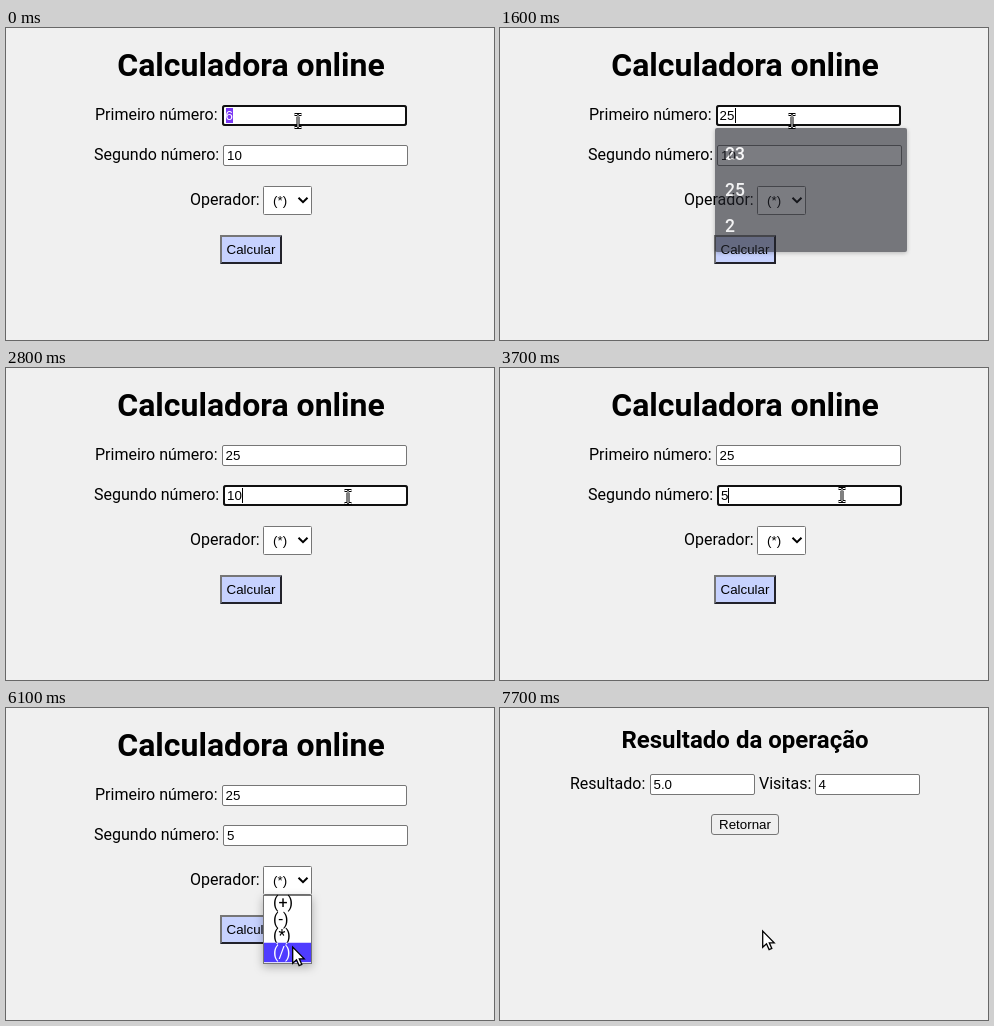
Write an HTML page that moves like this. It is 488x312 px and loops after 8 s.

```html
<!DOCTYPE html>
<html lang="pt">
<head>
<meta charset="utf-8">
<title>Calculadora online</title>
<style>
  html, body { margin: 0; width: 100%; height: 100%; overflow: hidden; background: #f0f0f0; }
  svg { display: block; width: 488px; height: 312px; }
  text { font: 16px Roboto, sans-serif; white-space: pre; }
  .ui text, text.ui { font: 13.333px "Liberation Sans", Arial, sans-serif; }
  .mid { text-anchor: middle; }
  text.h1 { font-size: 32px; font-weight: 700; }
  text.h2 { font-size: 24px; font-weight: 700; }
  .box { fill: #fff; stroke: #767676; }
  .ring { fill: none; stroke: #101010; stroke-width: 2; }
  .mark { fill: #7a38f5; }
  .caret { fill: #000; }
  .white text, text.white { fill: #fff; }
  .suggest text { font-size: 17.5px; font-weight: 500; fill: #f4f4f6; }
  .suggest rect { fill: #23252d; filter: drop-shadow(0 1px 2px rgba(0, 0, 0, .4)); }
  .popup > .box { filter: drop-shadow(0 3px 5px rgba(0, 0, 0, .28)); }

  /* Every part switches hard; 1.25% is 100 ms */
  [style*="--k"] { animation: var(--k) 8s step-end infinite; }

  @keyframes calc { 0% { opacity: 1 } 96.25%, 100% { opacity: 0 } }
  @keyframes result { 0% { opacity: 0 } 96.25%, 100% { opacity: 1 } }

  @keyframes first-focus { 0% { opacity: 1 } 35%, 100% { opacity: 0 } }
  @keyframes first-old { 0% { opacity: 1 } 16.25%, 100% { opacity: 0 } }
  @keyframes first-typing { 0% { opacity: 0 } 16.25% { opacity: 1 } 20%, 100% { opacity: 0 } }
  @keyframes first-typed { 0% { opacity: 0 } 20%, 100% { opacity: 1 } }
  @keyframes first-caret { 0% { opacity: 0 } 20% { opacity: 1 } 27.5%, 100% { opacity: 0 } }
  @keyframes suggest { 0% { opacity: 0 } 16.25% { opacity: 1 } 20% { opacity: .6 } 21.25% { opacity: .15 } 22.5%, 100% { opacity: 0 } }

  @keyframes second-focus { 0% { opacity: 0 } 35% { opacity: 1 } 67.5%, 100% { opacity: 0 } }
  @keyframes second-old { 0% { opacity: 1 } 38.75%, 100% { opacity: 0 } }
  @keyframes second-click { 0% { opacity: 0 } 35% { opacity: 1 } 38.75%, 100% { opacity: 0 } }
  @keyframes second-marked { 0% { opacity: 0 } 38.75% { opacity: 1 } 46.25%, 100% { opacity: 0 } }
  @keyframes second-typed { 0% { opacity: 0 } 46.25%, 100% { opacity: 1 } }
  @keyframes second-caret { 0% { opacity: 0 } 46.25% { opacity: 1 } 53.75% { opacity: 0 } 58.75% { opacity: 1 } 67.5%, 100% { opacity: 0 } }

  @keyframes popup { 0% { opacity: 0 } 67.5% { opacity: 1 } 81.25%, 100% { opacity: 0 } }
  @keyframes lit {
    0% { clip-path: inset(33.2px 0 16.6px) }
    71.25% { clip-path: inset(0 0 49.8px) }
    72.5% { clip-path: inset(16.6px 0 33.2px) }
    73.75% { clip-path: inset(33.2px 0 16.6px) }
    75%, 100% { clip-path: inset(49.8px 0 0) }
  }
  @keyframes op-old { 0% { opacity: 1 } 81.25%, 100% { opacity: 0 } }
  @keyframes op-new { 0% { opacity: 0 } 81.25%, 100% { opacity: 1 } }
  @keyframes op-focus { 0% { opacity: 0 } 81.25% { opacity: 1 } 93.75%, 100% { opacity: 0 } }
  @keyframes press { 0% { opacity: 0 } 93.75%, 100% { opacity: 1 } }

  @keyframes beam { 0% { opacity: 1 } 23.75% { opacity: 0 } 31.25% { opacity: 1 } 53.75%, 100% { opacity: 0 } }
  @keyframes arrow { 0% { opacity: 0 } 23.75% { opacity: 1 } 31.25% { opacity: 0 } 53.75%, 100% { opacity: 1 } }
  @keyframes pointer {
    0% { transform: translate(292px, 93px) }
    23.75% { transform: translate(302px, 66px) }
    25% { transform: translate(318px, 45px) }
    27.5% { transform: translate(326px, 52px) }
    28.75% { transform: translate(333px, 70px) }
    30% { transform: translate(337px, 102px) }
    31.25% { transform: translate(340px, 119px) }
    32.5% { transform: translate(341px, 125px) }
    33.75% { transform: translate(342px, 128px) }
    35% { transform: translate(342px, 129px) }
    37.5% { transform: translate(342px, 127px) }
    53.75% { transform: translate(334px, 142px) }
    55% { transform: translate(308px, 154px) }
    56.25% { transform: translate(291px, 159px) }
    58.75% { transform: translate(291px, 165px) }
    60% { transform: translate(289px, 163px) }
    61.25% { transform: translate(288px, 161px) }
    63.75% { transform: translate(288px, 165px) }
    65% { transform: translate(288px, 170px) }
    70% { transform: translate(288px, 178px) }
    71.25% { transform: translate(288px, 196px) }
    72.5% { transform: translate(287px, 213px) }
    73.75% { transform: translate(287px, 227px) }
    75% { transform: translate(286px, 236px) }
    76.25% { transform: translate(286px, 238px) }
    85% { transform: translate(279px, 234px) }
    86.25% { transform: translate(268px, 227px) }
    87.5% { transform: translate(260px, 221px) }
    88.75%, 100% { transform: translate(262px, 222px) }
  }
</style>
</head>
<body>
<svg viewBox="0 0 488 312">
  <defs>
    <g id="options">
      <text x="267" y="200">(+)</text>
      <text x="267" y="217">(-)</text>
      <text x="267" y="233">(*)</text>
      <text x="267" y="250">(/)</text>
    </g>
    <path id="ibeam" d="M-3.5 -6.5H-1L0 -5.5L1 -6.5H3.5M0 -5.5V5.5M-3.5 6.5H-1L0 5.5L1 6.5H3.5"/>
  </defs>

  <g style="--k: calc">
    <text class="h1 mid" x="245" y="48">Calculadora online</text>
    <text x="89" y="92">Primeiro número:</text>
    <text x="88" y="132">Segundo número:</text>
    <text x="184" y="177">Operador:</text>

    <g class="ui">
      <rect class="box" x="216.5" y="77.5" width="184" height="20" rx="1.5"/>
      <rect class="ring" x="217" y="78" width="183" height="19" rx="2" style="--k: first-focus"/>
      <g style="--k: first-old">
        <rect class="mark" x="220" y="80" width="7" height="15"/>
        <text class="white" x="219.5" y="92">6</text>
      </g>
      <g style="--k: first-typing">
        <text x="219.5" y="92">2</text>
        <rect class="caret" x="227" y="80" width="1" height="15"/>
      </g>
      <text x="219.5" y="92" style="--k: first-typed">25</text>
      <rect class="caret" x="235" y="80" width="1" height="15" style="--k: first-caret"/>

      <rect class="box" x="217.5" y="117.5" width="184" height="20" rx="1.5"/>
      <rect class="ring" x="218" y="118" width="183" height="19" rx="2" style="--k: second-focus"/>
      <text x="221" y="132" style="--k: second-old">10</text>
      <rect class="caret" x="236" y="120" width="1" height="15" style="--k: second-click"/>
      <g style="--k: second-marked">
        <rect class="mark" x="221" y="120" width="15" height="15"/>
        <text class="white" x="221" y="132">10</text>
      </g>
      <text x="221" y="132" style="--k: second-typed">5</text>
      <rect class="caret" x="228" y="120" width="1" height="15" style="--k: second-caret"/>

      <rect class="box" x="257.5" y="158.5" width="48" height="28" rx="1"/>
      <rect class="ring" x="258" y="159" width="47" height="27" rx="1.5" style="--k: op-focus"/>
      <text x="267" y="177" style="--k: op-old">(*)</text>
      <text x="267" y="177" style="--k: op-new">(/)</text>
      <path d="M292.5 169.8L297 174.2L301.5 169.8" fill="none" stroke="#000" stroke-width="2"/>

      <rect x="214" y="207" width="62" height="29" fill="#c7d2fe"/>
      <path d="M214 236V207H276L274 209H216V234Z" fill="#767676"/>
      <path d="M276 207V236H214L216 234H274V209Z" fill="#22222a"/>
      <g style="--k: press">
        <path d="M214 236V207H276L274 209H216V234Z" fill="#22222a"/>
        <path d="M276 207V236H214L216 234H274V209Z" fill="#767676"/>
      </g>
      <text class="mid" x="245" y="226">Calcular</text>
    </g>

    <g class="suggest" style="--k: suggest">
      <rect x="215" y="100" width="192" height="124" rx="2"/>
      <text x="225" y="132">23</text>
      <text x="225" y="168">25</text>
      <text x="225" y="204">2</text>
    </g>

    <g class="popup ui" style="--k: popup">
      <rect class="box" x="257.5" y="187.5" width="48" height="68"/>
      <use href="#options"/>
      <g class="white" style="--k: lit">
        <rect x="258" y="188" width="47" height="66.4" fill="#4f3cff"/>
        <use href="#options" fill="#fff"/>
      </g>
    </g>
  </g>

  <g style="--k: result">
    <text class="h2 mid" x="245" y="40">Resultado da operação</text>
    <text x="70" y="81">Resultado:</text>
    <text x="259" y="81">Visitas:</text>
    <g class="ui">
      <rect class="box" x="150.5" y="66.5" width="104" height="20" rx="1.5"/>
      <text x="153.5" y="81">5.0</text>
      <rect class="box" x="315.5" y="66.5" width="104" height="20" rx="1.5"/>
      <text x="318.5" y="81">4</text>
      <rect x="211.5" y="106.5" width="67" height="20" rx="2.5" fill="#efefef" stroke="#767676"/>
      <text class="mid" x="245" y="121">Retornar</text>
    </g>
  </g>

  <g style="--k: pointer">
    <g fill="none" style="--k: beam">
      <use href="#ibeam" stroke="#000" stroke-width="3"/>
      <use href="#ibeam" stroke="#fff"/>
    </g>
    <path d="M.7 1V17.3L4.5 13.8L7.1 19.6L9.8 18.4L7.3 12.8H12.2Z" fill="#fff" stroke="#000" stroke-width="1.3" style="--k: arrow"/>
  </g>
</svg>
</body>
</html>
```
